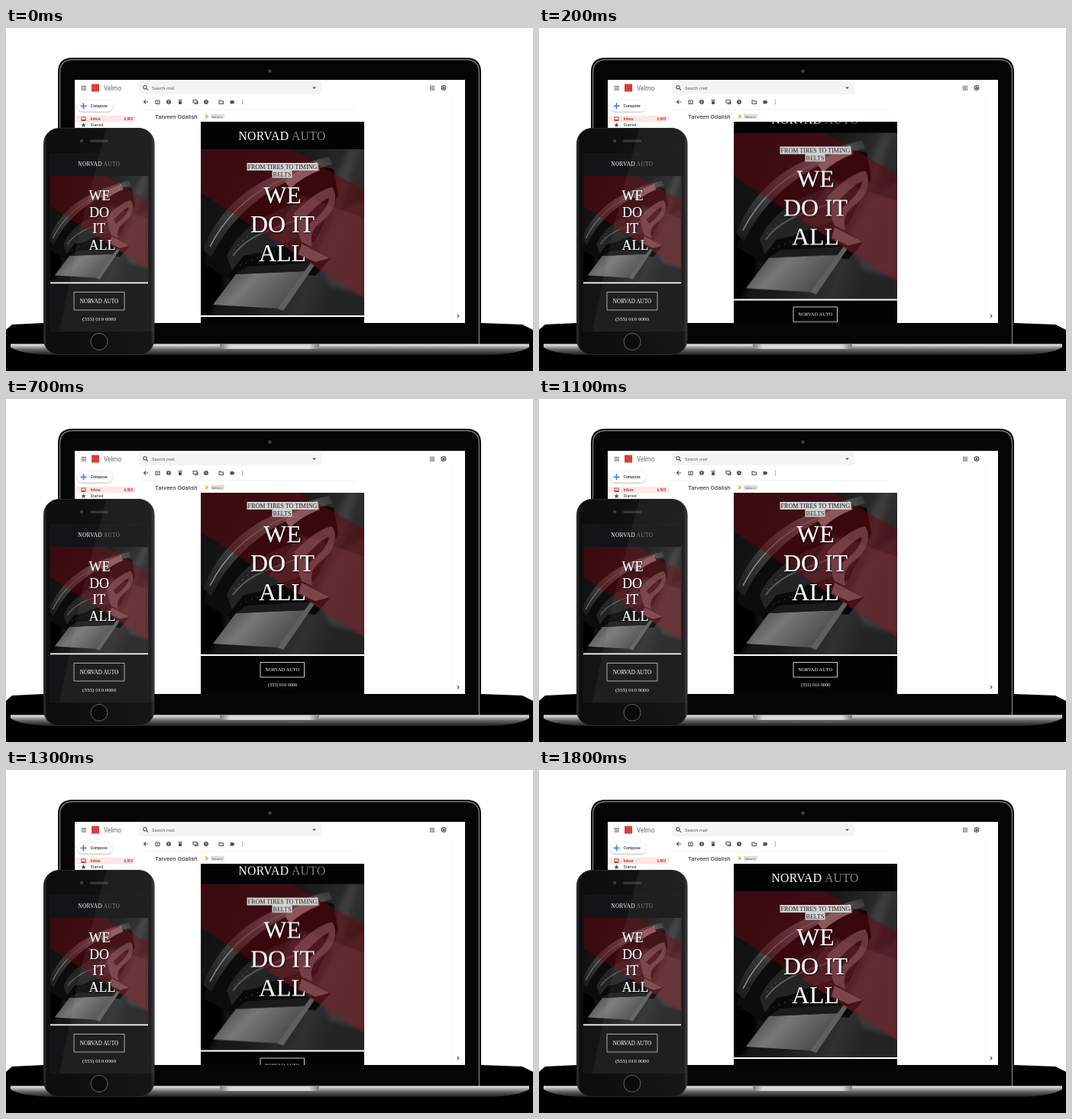
These frames come from a looping animation (690x450 px, 1.9 s). An HTML page:

```html
<!DOCTYPE html>
<html lang="en">
<head>
<meta charset="utf-8">
<title>Email on laptop and phone</title>
<style>
  html, body { margin: 0; width: 100%; height: 100%; overflow: hidden; background: #fff; }
  svg { display: block; width: 690px; height: 450px; }
  text { font-family: Roboto, Arial, sans-serif; }
  .serif text { font-family: "Liberation Serif", "Times New Roman", serif; text-anchor: middle; fill: #fff; }
  .serif .dim { fill: #858585; }
  .serif .ink { fill: #1c1c1c; }
  .icons { fill: none; stroke: #555; stroke-width: 1.1; }
  .icons .solid { fill: #555; stroke: none; }
  /* Two quick smooth scrolls, sampled at 10 pictures a second. */
  #page { animation: scroll 1.9s step-end infinite; }
  @keyframes scroll {
    0%      { transform: translateY(0); }
    10.526% { transform: translateY(-21.5px); }
    15.789% { transform: translateY(-42px); }
    63.157% { transform: translateY(-40px); }
    68.421% { transform: translateY(-9.5px); }
    73.684%, 100% { transform: translateY(0); }
  }
</style>
</head>
<body>
<svg viewBox="0 0 690 450">
  <defs>
    <linearGradient id="bg" x2="1" y2=".4">
      <stop offset="0" stop-color="#101010"/><stop offset=".55" stop-color="#191919"/>
      <stop offset=".85" stop-color="#303031"/><stop offset="1" stop-color="#242425"/>
    </linearGradient>
    <linearGradient id="fender" x1="0" y1="1" x2="1" y2="0">
      <stop offset="0" stop-color="#181818"/><stop offset=".4" stop-color="#444"/>
      <stop offset=".75" stop-color="#777"/><stop offset="1" stop-color="#333"/>
    </linearGradient>
    <linearGradient id="plate" x2="1" y2=".4">
      <stop offset="0" stop-color="#3a3a3a"/><stop offset=".45" stop-color="#777"/><stop offset="1" stop-color="#4a4a4a"/>
    </linearGradient>
    <linearGradient id="base" x2="0" y2="1">
      <stop offset="0" stop-color="#eee"/><stop offset=".2" stop-color="#bbb"/>
      <stop offset=".5" stop-color="#666"/><stop offset="1" stop-color="#1a1a1a"/>
    </linearGradient>
    <linearGradient id="notch" x2="1">
      <stop offset="0" stop-color="#777"/><stop offset=".1" stop-color="#d8d8d8"/>
      <stop offset=".9" stop-color="#d8d8d8"/><stop offset="1" stop-color="#777"/>
    </linearGradient>
    <linearGradient id="case" x2="1">
      <stop offset="0" stop-color="#333"/><stop offset=".03" stop-color="#0d0d0d"/>
      <stop offset=".97" stop-color="#161616"/><stop offset="1" stop-color="#3a3a3a"/>
    </linearGradient>
    <filter id="soft"><feGaussianBlur stdDeviation="3"/></filter>
    <filter id="glow" x="-20%" y="-20%" width="140%" height="140%">
      <feDropShadow dx="1" dy="1" stdDeviation="1" flood-opacity=".8"/>
    </filter>
    <clipPath id="mail"><path d="M255 123H469V387H255Z"/></clipPath>
    <clipPath id="frame"><path d="M0 0H214V218H0Z"/></clipPath>
    <clipPath id="small"><path d="M58 194H186V333H58Z"/></clipPath>

    <g id="photo" clip-path="url(#frame)">
      <path fill="url(#bg)" d="M0 0H214V218H0Z"/>
      <g filter="url(#soft)">
        <path fill="#4a4a4a" opacity=".6" d="M180 30L196 0H206L184 75L172 90Z"/>
        <path fill="#555" opacity=".5" d="M150 140L178 85L214 65V190L170 180Z"/>
        <path fill="#050505" d="M0 130L30 130L30 190L10 218H0Z"/>
      </g>
      <path fill="#0c0c0c" d="M4 150C14 105 45 60 92 42C125 28 155 20 174 26L180 60L150 120L40 172Z"/>
      <path fill="url(#fender)" d="M3 132C18 92 46 62 80 43C110 27 140 16 168 10L172 20C140 28 110 42 86 58C56 80 30 106 14 142Z"/>
      <path fill="none" stroke="#8f8f8f" stroke-width="1.500" d="M12 128C30 92 60 62 94 46C116 36 134 29 150 25"/>
      <path fill="#a9a2a3" d="M110 42C124 29 138 21 152 17L156 28C142 33 128 41 117 52Z"/>
      <path fill="#242424" d="M34 140C52 100 92 82 132 68L170 62C172 92 150 112 112 122C82 130 58 144 44 168Z"/>
      <path fill="none" stroke="#5c5c5c" stroke-width="2" d="M42 140C64 108 104 104 136 88"/>
      <path fill="#6d6869" d="M122 84C140 66 158 52 172 50C180 62 176 80 162 92C150 100 142 108 146 128L132 122C126 108 126 96 122 84Z"/>
      <path fill="#171717" d="M136 90C148 78 160 66 168 64C166 78 154 88 142 98Z"/>
      <path fill="#090909" d="M34 168L56 140L134 124L170 143L150 166L96 160Z"/>
      <path fill="url(#plate)" d="M16 204L46 164L138 160L100 209Z"/>
      <path fill="#1b1b1b" d="M46 164L60 154L144 149L138 160Z"/>
      <path fill="#5f5f5f" d="M100 209L144 149L149 152L108 212Z"/>
      <path fill="#787878" d="M132 124L169 143L150 148L128 138Z"/>
      <g fill="none" stroke="#aaa" stroke-width="1.300" stroke-linecap="round" stroke-dasharray=".1 8" opacity=".5">
        <path d="M44 132Q80 90 150 60"/><path d="M52 152Q100 132 150 112"/>
      </g>
      <path fill="#6b0612" opacity=".48" d="M0 0H118L214 54V196L0 57Z"/>
      <path fill="#b06068" opacity=".12" d="M90 115L130 60L214 90V196Z"/>
    </g>
  </defs>

  <!-- shadow and laptop -->
  <path d="M0 396L8 389L50 387H622L676 389L690 396V450H0Z"/>
  <path fill="#050505" d="M68 416V58Q68 39 87 39H603Q622 39 622 58V416Z"/>
  <path fill="none" stroke="#777" stroke-width="1.400" d="M70.500 415V59Q70.500 41.500 88 41.500H602Q619.500 41.500 619.500 59V415"/>
  <circle cx="345.500" cy="56.500" r="2.500" fill="#2b2b2b"/><circle cx="345.500" cy="56.500" r="1" fill="#666"/>
  <path fill="#fff" d="M90 68H601V387H90Z"/>
  <path fill="url(#base)" d="M6 414.500H685V419Q670 428 630 429H62Q20 428 6 419Z"/>
  <path fill="url(#notch)" d="M280 415H410V417Q409 421 403 421H287Q281 421 280 417Z"/>

  <!-- mail client -->
  <path fill="#d93f35" d="M112 73.500H122V83.500H112Z"/>
  <text x="128" y="81.500" font-size="8.200" fill="#666">Velmo</text>
  <rect x="174" y="70" width="239" height="17" rx="3" fill="#f4f4f5"/>
  <text x="191" y="80.500" font-size="5.700" fill="#666">Search mail</text>
  <path fill="#f2f2f2" d="M174 106.500H456V107.500H174ZM583 90H583.500V387H583Z"/>
  <rect x="92.500" y="95" width="48" height="16" rx="8" fill="#ccc"/>
  <rect x="92.500" y="94.200" width="48" height="15.600" rx="7.800" fill="#fff" stroke="#e2e2e2" stroke-width=".5"/>
  <path stroke="#4285f4" stroke-width="1.700" d="M97.500 102.300H105.500M101.500 98.300V106.300"/>
  <text x="110.500" y="104" font-size="5.200" font-weight="500" fill="#333">Compose</text>
  <path fill="#fce8e6" d="M90 115H166Q170 115 170 119T166 123.500H90Z"/>
  <g fill="#d23a2f" font-size="5.300" font-weight="700">
    <path d="M98.500 116.500H104.500V122H98.500Z"/><path fill="#fff" d="M99.500 117.500H103.500V120H99.500Z"/>
    <text x="110.500" y="121">Inbox</text><text x="166.500" y="121" text-anchor="end" font-size="4.700">6,803</text>
  </g>
  <path fill="#555" d="M101.500 124L102.400 126.300 104.700 126.500 102.900 128 103.500 130.300 101.500 129 99.500 130.300 100.100 128 98.300 126.500 100.600 126.300Z"/>
  <text x="110.500" y="129" font-size="5.300" fill="#333">Starred</text>
  <text x="195" y="118.700" font-size="7.800" fill="#222">Tarveen Odalish</text>
  <path fill="#f4b942" d="M260 113.500H263L265.500 116 263 118.500H260L262 116Z"/>
  <rect x="268" y="113" width="18" height="6" rx="1" fill="#ddd"/>
  <text x="269.500" y="117.700" font-size="4.300" fill="#666">Inbox x</text>
  <g class="icons">
    <path d="M98.500 76.500H105M98.500 78.700H105M98.500 81H105"/>
    <circle cx="182" cy="77.700" r="2.200"/><path d="M183.700 79.400L186 81.700"/>
    <path class="solid" d="M401 77.500H406L403.500 80Z"/>
    <path stroke-width="1.500" stroke-dasharray="1.500 .7" d="M555 76.500H561M555 78.700H561M555 81H561"/>
    <circle cx="573" cy="78.500" r="2.900"/><path class="solid" d="M571.500 80V78L573 76.800 574.500 78V80Z"/>
    <path d="M186 97H180.500M183 94.500L180.500 97 183 99.500"/>
    <path d="M196 95H201V99.500H196ZM198.500 96V98.500"/>
    <circle class="solid" cx="213" cy="97" r="3"/><path stroke="#fff" d="M213 95.200V97.300M213 98V99"/>
    <path class="solid" d="M225.500 94H230.500V95H225.500ZM226 95.700H230V100H226Z"/>
    <path d="M245 94.500H250V98H245ZM246.500 99.500H251V96"/>
    <circle class="solid" cx="262" cy="97" r="3"/><path stroke="#fff" stroke-width=".7" d="M262 95V97.200L263.500 98"/>
    <path d="M279 95H281L282 96H284.500V99.500H279Z"/>
    <path class="solid" d="M293.500 95H297.500L299.500 97.200 297.500 99.500H293.500Z"/>
    <path stroke-dasharray="1 1.300" d="M309.500 94.300V100"/>
    <path d="M591 376L593 378 591 380"/>
  </g>

  <!-- desktop email -->
  <g clip-path="url(#mail)" class="serif">
    <path fill="#030304" d="M255 123H469V387H255Z"/>
    <g id="page">
      <text x="361.500" y="146.500" font-size="15.700" letter-spacing=".4">NORVAD <tspan class="dim">AUTO</tspan></text>
      <use href="#photo" x="255" y="159"/>
      <path fill="#d2d2d2" d="M315.500 177H408.500V187H374.500V196.500H348.500V187H315.500Z"/>
      <g font-size="8.100"><text class="ink" x="362" y="185">FROM TIRES TO TIMING</text><text class="ink" x="361.500" y="195">BELTS</text></g>
      <g font-size="31.800" filter="url(#glow)">
        <text x="362" y="229.500">WE</text><text x="362" y="267.500">DO IT</text><text x="362" y="305.500">ALL</text>
      </g>
      <path fill="#fff" d="M255 377H469V379H255Z"/>
      <path fill="none" stroke="#ccc" d="M333 387.500H390.500V407H333Z"/>
      <text x="361.800" y="399.300" font-size="6.400">NORVAD AUTO</text>
      <text x="362" y="419" font-size="6.200">(555) 010 0000</text>
    </g>
  </g>

  <!-- phone -->
  <rect x="49.500" y="131.500" width="144.500" height="297" rx="20" fill="url(#case)" stroke="#292929"/>
  <circle cx="99" cy="148" r="2.500" fill="#2c2c30"/><circle cx="99" cy="148" r="1" fill="#555"/>
  <rect x="110" y="146.500" width="24" height="3.500" rx="1.700" fill="#353535"/>
  <path fill="#131415" stroke="#222" stroke-width=".5" d="M58 165H186V398H58Z"/>
  <g clip-path="url(#small)"><use href="#photo" transform="translate(53.500 194) scale(.64)"/></g>
  <path fill="#fff" opacity=".05" d="M131 132H175Q193 132 193 150V398H70L98 260Z"/>
  <g class="serif">
    <text x="121.800" y="181" font-size="7.200" letter-spacing=".4">NORVAD <tspan class="dim">AUTO</tspan></text>
    <g font-size="18" filter="url(#glow)">
      <text x="122.500" y="226">WE</text><text x="122" y="247.700">DO</text>
      <text x="121.700" y="269.200">IT</text><text x="126" y="291">ALL</text>
    </g>
    <path fill="#fff" d="M58 333.500H186V335.300H58Z"/>
    <path fill="none" stroke="#aaa" d="M89 346.500H155V370H89Z"/>
    <text x="122" y="360.700" font-size="7.200">NORVAD AUTO</text>
    <text x="122" y="383.700" font-size="7.150">(555) 010 0000</text>
  </g>
  <circle cx="122" cy="411.500" r="11" fill="#0b0b0b" stroke="#666"/>
</svg>
</body>
</html>
```
